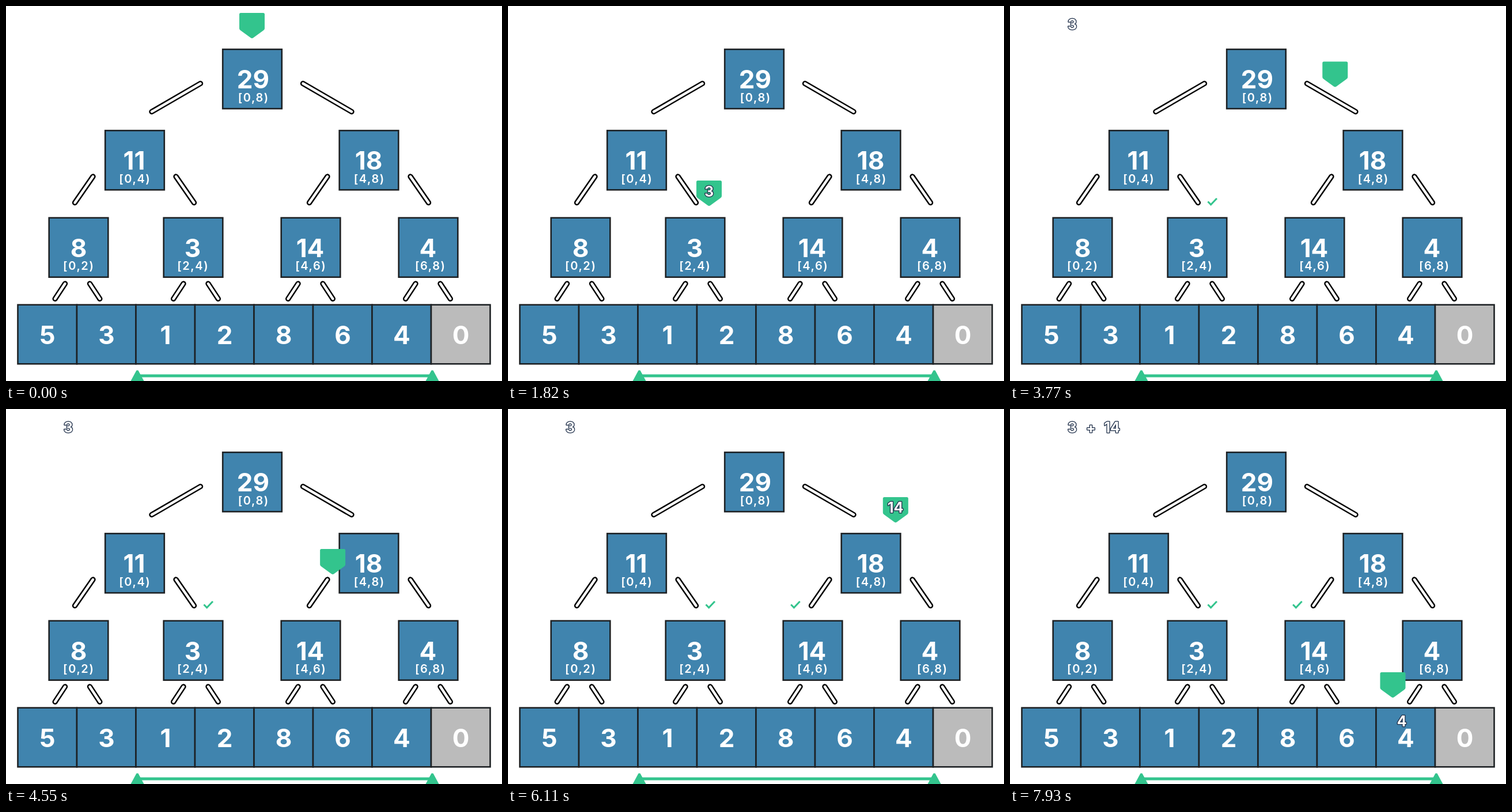
An HTML page that plays this animation: 861 by 651 pixels, repeating every 8 s.

```html
<!DOCTYPE html>
<html lang="en">
<head>
<meta charset="utf-8">
<title>Segment tree range sum</title>
<style>
  html, body { margin: 0; width: 100%; height: 100%; overflow: hidden; background: #fff; }
  svg { display: block; width: 861px; height: 651px; }
  text { font-family: Inter, sans-serif; font-weight: 700; fill: #fff; text-anchor: middle; }
  .value { font-size: 44px; }
  .range { font-size: 20px; font-weight: 600; letter-spacing: 1.6px; }
  .sum { font-size: 25px; stroke: #20304a; stroke-width: 2.6px; stroke-linejoin: round; paint-order: stroke; }
  .cell { fill: #4084ae; stroke: #1d2124; stroke-width: 2.6px; }
  .blank { fill: #bbb; }
  .green { fill: #33c48d; }
  .tick { fill: none; stroke: #33c48d; stroke-width: 3px; }
</style>
</head>
<body>
<svg id="stage" viewBox="0 0 861 651"></svg>
<script>
const LOOP = 8000, STEP = 130, MOVE = 300;
const stage = document.getElementById('stage');

function add(tag, attrs, content = '') {
  const el = document.createElementNS('http://www.w3.org/2000/svg', tag);
  for (const key in attrs) el.setAttribute(key, attrs[key]);
  el.textContent = content;
  return stage.appendChild(el);
}
const label = (cls, x, y, content) => add('text', { class: cls, x, y }, content);
const cell = (x, y, w, h, cls = '') => add('rect', { class: 'cell ' + cls, x, y, width: w, height: h });

function node(left, top, value, range, valueX, rangeX) {
  cell(left + 1.2, top + 1.2, 102.6, 103);
  label('value', valueX, top + 69, value);
  label('range', rangeX + 0.8, top + 91.5, range);
}

function rod(x1, y1, x2, y2) {
  for (const [stroke, width] of [['#000', 9.4], ['#fff', 4.4]])
    add('line', { x1, y1, x2, y2, stroke, 'stroke-width': width, 'stroke-linecap': 'round' });
}

// Two mirrored rods below a node
function branch(left, right, top, dx, dy) {
  rod(left, top, left - dx, top + dy);
  rod(right, top, right + dx, top + dy);
}

branch(337.5, 515.5, 134.5, 84.5, 49);
branch(151, 295, 296, 31.5, 45.5);
branch(558, 702, 296, 31.5, 45.5);
for (const x of [102.5, 308, 507, 711]) branch(x, x + 43, 482, 17.3, 26.3);

node(375, 74, 29, '[0,8)', 429, 429);
node(171, 215, 11, '[0,4)', 222.5, 223);
node(577.5, 215, 18, '[4,8)', 629.5, 630);
node(73.5, 366.5, 8, '[0,2)', 126, 125.5);
node(272.5, 366.5, 3, '[2,4)', 324, 324);
node(476.5, 366.5, 14, '[4,6)', 528, 528.5);
node(680.5, 366.5, 4, '[6,8)', 732.5, 736);

[5, 3, 1, 2, 8, 6, 4, 0].forEach((value, i) => {
  const x = 20.5 + i * 102.5;
  cell(x, 518.7, 102.5, 102.6, i === 7 ? 'blank' : '');
  label('value', x + 51.5, 586.5, value);
});

add('path', { class: 'green', d: 'M228 639.5H740V644.5H228Z' });
for (const x of [228, 740])
  add('path', { class: 'green', d: `M${x - 1.5} 632.5h3L${x + 11.5} 651h-23Z` });

const tick = x => add('path', { class: 'tick', d: `M${x - 5.5} 339.5l5.2 5.3l10.3 -10.8` });
const ticks = [[tick(349), 1905], [tick(496.7), 5680]];

const marker = add('path', {
  class: 'green',
  d: 'M-19.5 0H19.5Q22 0 22 2.5V27Q22 29 20 30.3L2.5 43Q0 45 -2.5 43L-20 30.3Q-22 29 -22 27V2.5Q-22 0 -19.5 0Z'
});
const plus = label('sum', 140.5, 41.5, '+');

// Marker stops: departure time, then centre x and top y
const stops = [
  [0, 427, 12],
  [80, 223, 153], [730, 349, 303],
  [1905, 190.6, 153], [2538, 402, 12],
  [3600, 672.8, 153], [4380, 496.5, 303],
  [5680, 672.8, 153], [6756, 707.4, 303], [7490, 664.5, 457]
];

// Sum parts rise from a tile into the marker, then fly to the top line
const parts = [
  { text: 3, from: [324, 428], rise: 1405, fly: 3050, to: [108, 41.2] },
  { text: 14, from: [528, 428], rise: 4915, fly: 6105, to: [177, 41.2] },
  { text: 4, from: [687, 580], rise: 7785, fly: Infinity, to: [0, 0] }
].map(part => ({ ...part, el: label('sum', 0, 0, part.text) }));

function ease(t, start, length) {
  const u = Math.min(1, Math.max(0, (t - start) / length));
  return u * u * (3 - 2 * u);
}
const mix = (a, b, f) => a.map((v, i) => v + (b[i] - v) * f);
const show = (el, on) => el.setAttribute('visibility', on ? 'visible' : 'hidden');
const place = (el, [x, y]) => el.setAttribute('transform', `translate(${x.toFixed(2)} ${y.toFixed(2)})`);

function markerAt(t) {
  let pos = stops[0].slice(1);
  for (const [start, ...point] of stops.slice(1)) pos = mix(pos, point, ease(t, start, MOVE));
  return pos;
}

function draw(t) {
  const [x, y] = markerAt(t);
  place(marker, [x, y]);
  for (const [el, start] of ticks) show(el, t >= start);
  show(plus, t >= 6370);
  for (const part of parts) {
    show(part.el, t >= part.rise);
    const held = mix(part.from, [x, y + 27.5], ease(t, part.rise, 400));
    place(part.el, t < part.fly ? held : mix(held, part.to, ease(t, part.fly, 450)));
  }
}

const begin = performance.now();
function tickFrame() {
  const t = (performance.now() - begin) % LOOP;
  draw(Math.floor(t / STEP) * STEP);
  requestAnimationFrame(tickFrame);
}
draw(0);
requestAnimationFrame(tickFrame);
</script>
</body>
</html>
```
